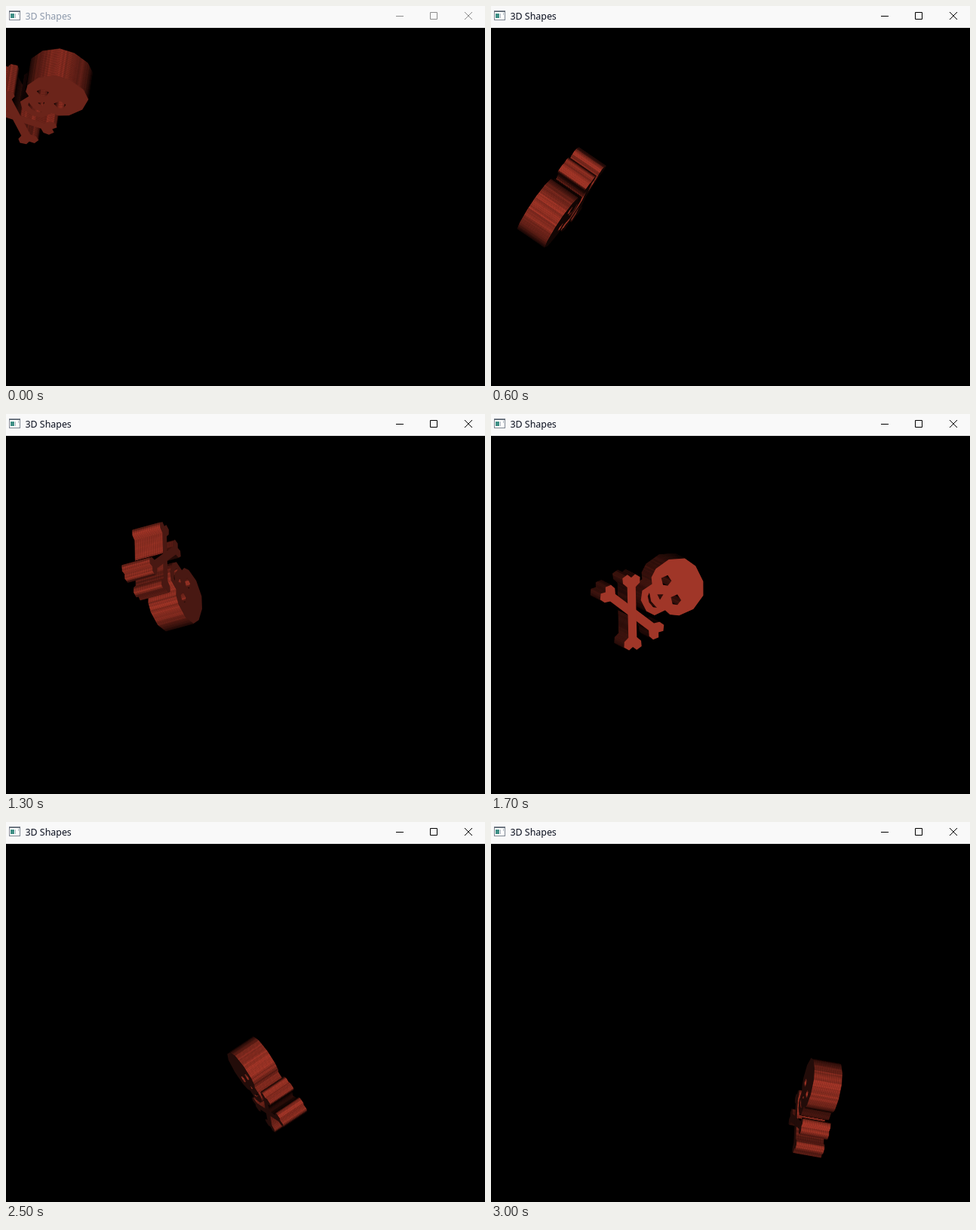
An HTML page with a canvas that plays this animation: 635x504 px, repeating every 3100 ms.

```html
<!DOCTYPE html>
<html lang="en">
<head>
<meta charset="utf-8">
<title>3D Shapes</title>
<style>
html, body { margin: 0; width: 100%; height: 100%; overflow: hidden; background: #000; }
canvas, svg { position: absolute; left: 0; top: 0; display: block; }
text { font: 12.4px "Noto Sans", "Open Sans", sans-serif; }
</style>
</head>
<body>
<canvas id="view" width="635" height="504"></canvas>
<svg width="635" height="29" viewBox="0 0 635 29">
  <rect width="635" height="29" fill="#f9f9f9"/>
  <rect x="4.5" y="6.5" width="14" height="12" fill="#fff" stroke="#7d8590"/>
  <path d="M4 7.5H19" stroke="#5f6873"/>
  <rect x="6" y="10" width="5" height="6" fill="#3f8f86"/>
  <path d="M12.5 10V16M16.5 9V12" stroke="#a9b4bd"/>
  <text id="title" x="25.5" y="18">3D Shapes</text>
  <g id="buttons" fill="none" stroke="#000">
    <path d="M517 13.5H527M562.5 8.5H571.5V17.5H562.5Z"/>
    <path d="M608 8L618 18M618 8L608 18"/>
  </g>
</svg>
<script>
const LOOP = 3100, STEP = 100, HALF = 20, LAYERS = 24;
const TINT = [170, 57, 42];
const ctx = document.getElementById('view').getContext('2d');
const title = document.getElementById('title');
const buttons = document.getElementById('buttons');

// Each pose: time, scale, centre of the crossed bones, up axis, front axis (y up).
const poses = [
  [0, 1.15, 14, 148, .7, .38, .6, -.12, -.77, .63],
  [600, 1.1, 123, 256, -.44, -.4, .8, .79, -.54, .1],
  [1300, 1.05, 211, 190, .44, -.73, -.515, .88, .24, .43],
  [1700, 1.06, 187, 263, .86, .49, -.19, .3, -.15, .94],
  [2100, 1, 217, 358, .33, .74, .62, -.21, -.61, .77],
  [2500, .95, 347, 385, -.53, .82, 0, -.8, -.53, .2],
  [3000, .95, 404, 397, .2, .8, .53, -.95, .17, .2]
];
const MID = 40;   // height of the solid's middle above the bones

const dot = (a, b) => a[0] * b[0] + a[1] * b[1] + a[2] * b[2];
const unit = a => { const l = Math.hypot(...a); return a.map(v => v / l); };
const cross = (a, b) => [
  a[1] * b[2] - a[2] * b[1], a[2] * b[0] - a[0] * b[2], a[0] * b[1] - a[1] * b[0]
];

function axes(up, front) {
  const az = unit(front), d = dot(up, az);
  const ay = unit(up.map((v, i) => v - d * az[i]));
  return [cross(ay, az), ay, az];
}

// Move each pose's anchor from the bones to the middle of the solid.
const keys = poses.map(p => {
  const s = p[1], [, ay, az] = axes(p.slice(4, 7), p.slice(7));
  return [p[0], s,
    p[2] + s * (MID * ay[0] - HALF * az[0]),
    p[3] - s * (MID * ay[1] - HALF * az[1]), ...ay, ...az];
});

function sample(t) {
  let i = 0;
  while (i < keys.length - 2 && t >= keys[i + 1][0]) i++;
  const a = keys[i], b = keys[i + 1], span = b[0] - a[0], u = (t - a[0]) / span;
  const before = keys[Math.max(i - 1, 0)], after = keys[Math.min(i + 2, keys.length - 1)];
  const u2 = u * u, u3 = u2 * u;
  return a.map((v, j) => {
    const m0 = (b[j] - before[j]) / (b[0] - before[0]) * span;
    const m1 = (after[j] - v) / (after[0] - a[0]) * span;
    return v * (2 * u3 - 3 * u2 + 1) + m0 * (u3 - 2 * u2 + u)
      + b[j] * (3 * u2 - 2 * u3) + m1 * (u3 - u2);
  });
}

const mirror = half => [...half, ...half.slice().reverse().map(([x, y]) => [-x, y])];
const skull = mirror([[8, 17], [18, 24], [19, 39], [27, 42], [34, 52], [36, 72], [27, 91], [11, 99]]);
const eye = x => [[x - 6, 53], [x - 5, 62], [x + 4, 63], [x + 7, 56], [x + 3, 51]].reverse();
const nose = [[0, 46], [4, 39], [-4, 39]];
const mouth = [[-11, 31], [0, 28], [11, 31], [8, 27], [0, 25], [-8, 27]];

function bone(angle) {
  const c = Math.cos(angle), s = Math.sin(angle);
  const end = [[32, -5.5], [37, -11], [44, -11.5], [48, -5], [44, 0],
    [48, 5], [44, 11.5], [37, 11], [32, 5.5]];
  return [...end, ...end.map(([x, y]) => [-x, -y])]
    .map(([x, y]) => [x * c - y * s, x * s + y * c]);
}

const solids = [
  [skull, eye(-14), eye(14), nose, mouth],
  [bone(.443)],
  [bone(-.443)]
];

// Split outlines into narrow wall strips with a shading normal and a grain value.
const area = p => p.reduce((sum, [x, y], i) => {
  const [a, b] = p[(i + 1) % p.length];
  return sum + x * b - a * y;
}, 0);

let seed = 7;
const random = () => (seed = seed * 16807 % 2147483647) / 2147483647;

function strips(loop, hole) {
  const n = loop.length, out = [];
  const points = (area(loop) > 0) === hole ? loop.slice().reverse() : loop;
  const normals = points.map(([x, y], i) => {
    const [a, b] = points[(i + 1) % n], l = Math.hypot(a - x, b - y);
    return [(b - y) / l, (x - a) / l];
  });
  const mix = (p, q, f) => [p[0] + (q[0] - p[0]) * f, p[1] + (q[1] - p[1]) * f];
  points.forEach((p, i) => {
    const q = points[(i + 1) % n], own = normals[i];
    const first = mix(normals[(i + n - 1) % n], own, .5);
    const last = mix(own, normals[(i + 1) % n], .5);
    const count = Math.max(1, Math.round(Math.hypot(q[0] - p[0], q[1] - p[1]) / 2.2));
    for (let k = 0; k < count; k++) {
      const m = mix(first, last, (k + .5) / count), l = Math.hypot(...m) || 1;
      out.push({
        a: mix(p, q, k / count), b: mix(p, q, (k + 1) / count),
        face: own, shade: [m[0] / l, m[1] / l], grain: .8 + .3 * random()
      });
    }
  });
  return out;
}
const walls = solids.flatMap(s => s.flatMap((loop, i) => strips(loop, i > 0)));

const colour = k => {
  const v = Math.min(1, Math.max(.03, k));
  return `rgb(${TINT.map(c => Math.round(c * v)).join()})`;
};

function drawShape(t) {
  const [, s, cx, cy, ...dir] = sample(t);
  const [ax, ay, az] = axes(dir.slice(0, 3), dir.slice(3));
  const project = ([x, y], z) => [
    cx + s * (x * ax[0] + (y - MID) * ay[0] + z * az[0]),
    cy - s * (x * ax[1] + (y - MID) * ay[1] + z * az[1])
  ];
  const trace = points => {
    points.forEach((p, i) => i ? ctx.lineTo(...p) : ctx.moveTo(...p));
    ctx.closePath();
  };
  const slice = (z, k) => {
    ctx.fillStyle = colour(k);
    for (const solid of solids) {
      ctx.beginPath();
      solid.forEach(loop => trace(loop.map(p => project(p, z))));
      ctx.fill('evenodd');
    }
  };

  const side = az[2] < 0 ? -1 : 1, light = Math.abs(az[2]);
  const lit = walls
    .filter(w => w.face[0] * ax[2] + w.face[1] * ay[2] > 0)
    .map(w => ({ ...w, fill: colour((w.shade[0] * ax[2] + w.shade[1] * ay[2]) * w.grain) }));

  // Layers run from the far side to the near side, so later ones cover earlier ones.
  ctx.lineWidth = .5;
  for (let k = 0; k < LAYERS; k++) {
    const z0 = side * HALF * (2 * k / LAYERS - 1);
    const z1 = side * HALF * (2 * (k + 1) / LAYERS - 1);
    slice(z0, light * .5);
    for (const w of lit) {
      ctx.fillStyle = ctx.strokeStyle = w.fill;
      ctx.beginPath();
      trace([project(w.a, z0), project(w.b, z0), project(w.b, z1), project(w.a, z1)]);
      ctx.fill();
      ctx.stroke();
    }
  }
  slice(side * HALF, light);
}

function render(t) {
  ctx.fillStyle = '#000';
  ctx.fillRect(0, 0, 635, 504);
  drawShape(t);
  const active = t >= STEP;
  title.setAttribute('fill', active ? '#0a0f1e' : '#8d99ab');
  buttons.setAttribute('stroke', active ? '#000' : '#8c8c8c');
}

let start = null, shown = -1;
function tick(now) {
  if (start === null) start = now;
  const t = Math.floor((now - start) % LOOP / STEP) * STEP;
  if (t !== shown) render(shown = t);
  requestAnimationFrame(tick);
}
render(0);
requestAnimationFrame(tick);
</script>
</body>
</html>
```
